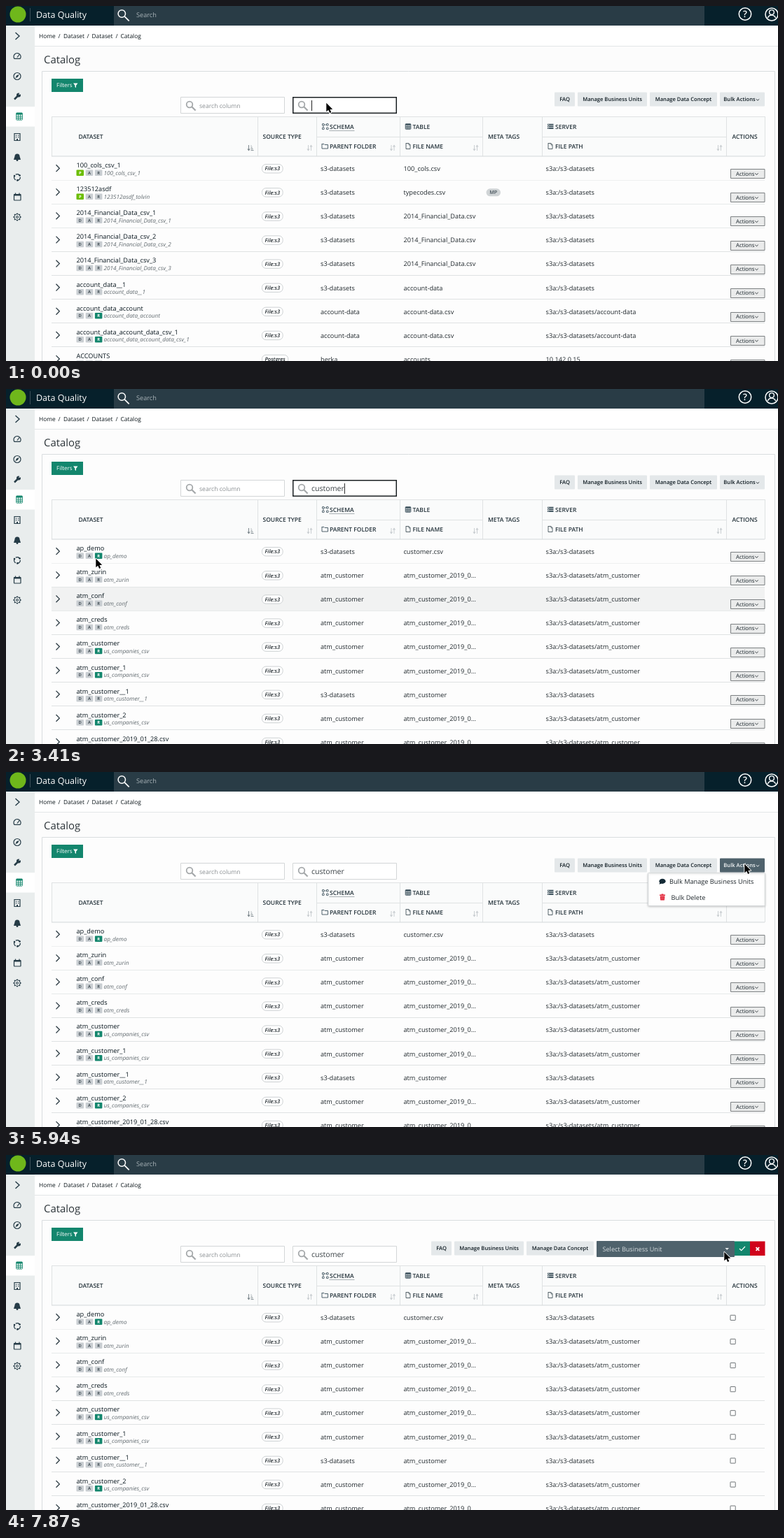
Recreate the animation shown at these times as an HTML page with a canvas. Size 1102x508 px, loop 8 s.

```html
<!DOCTYPE html>
<html lang="en">
<head>
<meta charset="utf-8">
<title>Data Quality catalog</title>
<style>
html, body { margin: 0; width: 100%; height: 100%; overflow: hidden; background: #fcfcfc; }
canvas { display: block; }
</style>
</head>
<body>
<canvas id="stage" width="1102" height="508"></canvas>
<script>
const W = 1102, H = 508, LOOP = 8000;
const ctx = document.getElementById('stage').getContext('2d');
const INK = '#20282d', LINE = '#dfe2e3', GREEN = '#13866d', NAVY = '#06202b', SLATE = '#4f626c';
const ROW_TOP = 215, ROW_H = 34.1;

// Each entry: start time, then the value held until the next entry.
const TYPED = [[0, ''], [600, 'c'], [750, 'cu'], [890, 'cus'], [1190, 'custom'], [1340, 'customer']];
const CARET = [[0, true], [300, false], [600, true], [1780, false], [2380, true], [2830, false], [3410, true], [3860, false]];
const POINTER = [
  [0, 457, 138], [2830, 430, 195], [2980, 315, 305], [3130, 205, 383], [3270, 140, 305],
  [3410, 128, 242], [3560, 150, 230], [3710, 225, 280], [3860, 323, 324], [4010, 470, 290],
  [4160, 660, 232], [4310, 850, 180], [4450, 985, 145], [4600, 1050, 127], [4750, 1056, 123],
  [5800, 1054, 131], [5950, 1050, 146], [6090, 1048, 155], [7580, 1040, 147], [7730, 1033, 142], [7870, 1025, 138]
];
const stepIndex = (list, t) => list.findLastIndex(e => e[0] <= t);
const at = (list, t) => list[stepIndex(list, t)][1];

const s3 = (name, sub, badges, parent, file, path) =>
  ({ name, sub, badges, type: 'File:s3', parent, file, path: 's3a:/s3-datasets' + path });
const atm = (name, sub, badges) =>
  s3(name, sub, badges, 'atm_customer', 'atm_customer_2019_0...', '/atm_customer');
const finance = n =>
  s3('2014_Financial_Data_csv_' + n, '2014_Financial_Data_csv_' + n, 'DA', 's3-datasets', '2014_Financial_Data.csv', '');

const ALL_ROWS = [
  s3('100_cols_csv_1', '100_cols_csv_1', 'PA', 's3-datasets', '100_cols.csv', ''),
  { ...s3('123512asdf', '123512asdf_tolvin', 'PA', 's3-datasets', 'typecodes.csv', ''), tag: 'MP' },
  finance(1), finance(2), finance(3),
  s3('account_data__1', 'account_data__1', 'DA', 's3-datasets', 'account-data', ''),
  s3('account_data_account', 'account_data_account', 'DA+', 'account-data', 'account-data.csv', '/account-data'),
  s3('account_data_account_data_csv_1', 'account_data_account_data_csv_1', 'DA+', 'account-data', 'account-data.csv', '/account-data'),
  { name: 'ACCOUNTS', sub: '', badges: 'DA', type: 'Postgres', parent: 'berka', file: 'accounts', path: '10.142.0.15' }
];
const FOUND_ROWS = [
  s3('ap_demo', 'ap_demo', 'DA+', 's3-datasets', 'customer.csv', ''),
  atm('atm_zurin', 'atm_zurin', 'DA'), atm('atm_conf', 'atm_conf', 'DA'), atm('atm_creds', 'atm_creds', 'DA'),
  atm('atm_customer', 'us_companies_csv', 'DA+'), atm('atm_customer_1', 'us_companies_csv', 'DA+'),
  s3('atm_customer__1', 'atm_customer__1', 'DA', 's3-datasets', 'atm_customer', ''),
  atm('atm_customer_2', 'us_companies_csv', 'DA+'), atm('atm_customer_2019_01_28.csv', '', 'DA')
];

function rect(x, y, w, h, fill, stroke, r = 0, lw = 1) {
  ctx.beginPath();
  ctx.roundRect(x, y, w, h, r);
  if (fill) { ctx.fillStyle = fill; ctx.fill(); }
  if (stroke) { ctx.strokeStyle = stroke; ctx.lineWidth = lw; ctx.stroke(); }
}
function circle(x, y, r, fill, stroke, lw = 1) {
  rect(x - r, y - r, 2 * r, 2 * r, fill, stroke, r, lw);
}
function line(color, lw, ...pts) {
  ctx.beginPath();
  for (let i = 0; i < pts.length; i += 2) ctx.lineTo(pts[i], pts[i + 1]);
  ctx.strokeStyle = color;
  ctx.lineWidth = lw;
  ctx.stroke();
}
function poly(fill, ...pts) {
  ctx.beginPath();
  for (let i = 0; i < pts.length; i += 2) ctx.lineTo(pts[i], pts[i + 1]);
  ctx.fillStyle = fill;
  ctx.fill();
}
const setFont = (size, style = '') => { ctx.font = `${style} ${size}px "Open Sans", "Noto Sans", sans-serif`; };
// y is the middle of the capital letters.
function text(str, x, y, size, color = INK, style = '', align = 'left') {
  setFont(size, style);
  ctx.textAlign = align;
  ctx.fillStyle = color;
  ctx.fillText(str, x, y + size * 0.36);
}
function magnifier(x, y, r, color, lw) {
  circle(x, y, r, null, color, lw);
  line(color, lw * 1.2, x + r * 0.7, y + r * 0.7, x + r * 2, y + r * 2);
}
function chevronDown(x, y, color) {
  line(color, 0.9, x - 2.2, y - 0.8, x, y + 1.2, x + 2.2, y - 0.8);
}
function pageIcon(x, y) {
  line('#45535b', 0.9, x - 3, y - 4, x + 1, y - 4, x + 3, y - 2, x + 3, y + 4, x - 3, y + 4, x - 3, y - 4.4);
  line('#45535b', 0.8, x + 1, y - 4, x + 1, y - 1.6, x + 3, y - 1.6);
}
function tableIcon(x, y, w, h, color) {
  rect(x - w / 2, y - h / 2, w, h, null, color, 0.5);
  rect(x - w / 2, y - h / 2, w, h / 4, color);
  for (const k of [-1, 1]) line(color, 0.9, x + k * w / 6, y - h / 2, x + k * w / 6, y + h / 2);
  for (const k of [0, 0.25]) line(color, 0.9, x - w / 2, y + h * k, x + w / 2, y + h * k);
}
function sortIcon(x, y, color, bars) {
  line(color, 1, x - 2, y - 4, x - 2, y + 3.5);
  poly(color, x - 4.2, y + 1.5, x + 0.2, y + 1.5, x - 2, y + 4.5);
  if (bars) {
    for (let i = 0; i < 4; i++) line(color, 1, x + 1, y - 3 + i * 2.2, x + 2 + i, y - 3 + i * 2.2);
  } else {
    line(color, 1, x + 2, y - 3.5, x + 2, y + 4);
    poly(color, x - 0.2, y - 1.5, x + 4.2, y - 1.5, x + 2, y - 4.5);
  }
}

function drawTopBar() {
  rect(0, 0, W, 28, NAVY);
  rect(154, 0, 843, 28, '#293c46');
  circle(17, 12, 11.5, '#6fb71b');
  rect(34, 3, 1, 19, '#3a4d57');
  text('Data Quality', 43, 12.5, 12.5, '#fff');
  magnifier(165.3, 11, 5.2, '#fff', 1.5);
  text('Search', 186, 12.5, 9.2, '#a9b3b8');
  circle(1055, 11.5, 8.7, null, '#fff', 1.5);
  text('?', 1055, 11.8, 13, '#fff', '600', 'center');
  circle(1093, 12, 9, null, '#fff', 1.5);
  circle(1093, 9, 3.4, null, '#fff', 1.4);
  ctx.beginPath();
  ctx.arc(1093, 19, 6, Math.PI * 1.1, Math.PI * 1.9);
  ctx.stroke();
}

function drawSidebar() {
  const c = '#263c47';
  rect(0, 28, 41, H, '#e9eded');
  rect(0, 144, 41, 28.5, '#fff');
  line(c, 1.4, 13.5, 38, 19, 43, 13.5, 48);
  ctx.beginPath();
  ctx.arc(16, 72.5, 5, Math.PI * 0.8, Math.PI * 2.2);
  ctx.closePath();
  ctx.lineWidth = 1.2;
  ctx.stroke();
  line(c, 1.2, 16, 73.5, 19, 69.5);
  circle(16, 100.5, 5, null, c, 1.2);
  poly(c, 18.7, 97.8, 17, 101.5, 13.3, 103.2, 15, 99.5);
  line(c, 2.5, 12, 133.5, 17, 128.5);
  circle(18, 127.5, 3, c);
  poly('#e9eded', 18, 127, 20, 123.5, 22.5, 126);
  tableIcon(19, 158, 8.5, 10, GREEN);
  rect(12, 182.5, 8, 10, null, c, 0, 1.2);
  for (const x of [14, 17]) for (const y of [184.5, 187]) rect(x, y, 1.3, 1.3, c);
  rect(15, 190, 2, 2.5, c);
  ctx.beginPath();
  ctx.arc(16, 215, 3.5, Math.PI, 0);
  ctx.lineTo(21, 220);
  ctx.lineTo(11, 220);
  ctx.fillStyle = c;
  ctx.fill();
  circle(16, 220.7, 1.4, c);
  for (let i = 0; i < 3; i++) {
    const a = i * Math.PI * 2 / 3;
    ctx.beginPath();
    ctx.arc(16, 245, 4.4, a, a + 1.5);
    ctx.strokeStyle = c;
    ctx.lineWidth = 1.4;
    ctx.stroke();
    circle(16 + 4.4 * Math.cos(a + 1.5), 245 + 4.4 * Math.sin(a + 1.5), 1.3, c);
  }
  rect(11.5, 269.5, 9.5, 8.5, null, c, 0.5, 1.2);
  rect(11.5, 269.5, 9.5, 2, c);
  for (const x of [13.5, 19]) line(c, 1.2, x, 267.5, x, 270);
  for (let i = 0; i < 8; i++) {
    const a = i * Math.PI / 4, dx = Math.cos(a), dy = Math.sin(a);
    line(c, 1.6, 16 + 4 * dx, 302 + 4 * dy, 16 + 5.6 * dx, 302 + 5.6 * dy);
  }
  circle(16, 302, 4.2, null, c, 1.1);
  circle(16, 302, 1.5, null, c, 1);
}

function searchBox(x, focused) {
  if (focused) rect(x + 0.75, 130.75, 147.5, 22.5, '#fff', '#1b2023', 0, 1.5);
  else rect(x + 0.5, 130.5, 148, 23, '#fff', '#d3d6d7');
  magnifier(x + 13, 141, 4.3, '#a4a8aa', 1.8);
}

function button(label, x, w, active) {
  rect(x, 123.5, w, 20, active ? SLATE : '#e4e8ea', null, 1);
  const arrow = label === 'Bulk Actions';
  text(label, x + w / 2 - (arrow ? 4 : 0), 133.5, 7.6, active ? '#f4f6f7' : '#101c23', '600', 'center');
  if (arrow) chevronDown(x + w - 10, 134, active ? '#fff' : INK);
}

function drawToolbar(t) {
  rect(65, 104, 45, 19, GREEN);
  text('Filters', 72, 113.5, 8, '#fff', '500');
  poly('#fff', 96, 110.5, 102.5, 110.5, 100, 113.7, 100, 117, 98.5, 116, 98.5, 113.7);

  searchBox(249, false);
  text('search column', 276, 142.5, 8.6, '#8a8f92');
  searchBox(409, t < 4750);
  const typed = at(TYPED, t);
  text(typed, 436, 142, 10.6, '#3a4145');
  if (at(CARET, t)) rect(436 + ctx.measureText(typed).width, 135, 1, 15, '#222');

  const form = t >= 6830, dx = form ? -176 : 0;
  button('FAQ', 783 + dx, 29, false);
  button('Manage Business Units', 816 + dx, 99, false);
  button('Manage Data Concept', 919 + dx, 96, false);
  if (!form) return button('Bulk Actions', 1019, 64, t >= 4600 && t < 6680);

  const dark = t >= 7870;
  rect(843.5, 123.5, 196, 22, dark ? SLATE : '#fff', dark ? SLATE : '#cfd3d5');
  text('Select Business Unit', 851.5, 134.5, 9.1, dark ? '#d5dbde' : '#9a9ea0');
  poly(dark ? '#e4e8ea' : '#3a4348', 1026.5, 133, 1032, 133, 1029.2, 136);
  rect(1040, 123.5, 22, 20.5, GREEN);
  line('#fff', 1.2, 1047, 134, 1049.7, 136.7, 1055, 131);
  rect(1062, 123.5, 21.5, 20.5, '#d0021b');
  for (const s of [-1, 1]) line('#fff', 1.9, 1070.6, 134.5 - 2.3 * s, 1075.2, 134.5 + 2.3 * s);
}

function drawTableHead() {
  rect(65, 158, 1018, 57, '#fafbfb');
  for (const x of [65, 359, 443, 562, 680, 765, 1028, 1083]) rect(x, 158, 1, 57, LINE);
  rect(65, 158, 1018, 1, LINE);
  rect(65, 214.5, 1018, 1, '#d3d7d9');
  rect(443, 187, 237, 1, LINE);
  rect(765, 187, 263, 1, LINE);
  const head = (label, x, y) => text(label, x, y, 8.5, '#26343c', '600');
  head('DATASET', 103.5, 187);
  head('SOURCE TYPE', 366.5, 187);
  head('SCHEMA', 462, 172.5);
  head('PARENT FOLDER', 462, 200.8);
  head('TABLE', 580.5, 172.5);
  head('FILE NAME', 580.5, 200.8);
  head('META TAGS', 688, 187);
  head('SERVER', 784, 172.5);
  head('FILE PATH', 784, 200.8);
  head('ACTIONS', 1036.5, 187);
  for (let x = 462; x < 497; x += 2) rect(x, 178, 1, 1, '#56636a');
  sortIcon(348.5, 203, '#7b868c', true);
  for (const x of [433.5, 552, 670.5, 1018.5]) sortIcon(x, 203, '#c9ced1');

  const c = '#3d525d';
  for (const x of [451.5, 457.5]) for (const y of [168.5, 174]) rect(x, y, 2.6, 2.6, null, c, 0.4, 0.9);
  line(c, 0.7, 454, 170, 457.5, 170);
  line(c, 0.7, 453, 171, 453, 174);
  tableIcon(574, 172.5, 7.5, 7.5, c);
  for (let i = 0; i < 3; i++) {
    rect(773, 168.7 + i * 2.7, 8.5, 1.9, c);
    rect(774, 169.2 + i * 2.7, 1, 0.9, '#fff');
  }
  line(c, 0.9, 451, 197.5, 454, 197.5, 455, 198.5, 459.5, 198.5, 459.5, 204, 451, 204, 451, 197);
  pageIcon(574, 200.5);
  pageIcon(777, 200.5);
}

function badge(letter, x, y, fill) {
  rect(x, y, 10.5, 8.5, fill || '#c9ced2', null, 1);
  text(letter, x + 5.25, y + 4.3, 5.8, fill ? '#fff' : '#48535a', '700', 'center');
}

function drawRow(row, i, boxes, hover) {
  const top = ROW_TOP + i * ROW_H, mid = top + 17.75;
  rect(65, top + 0.5, 1018, ROW_H, hover ? '#f1f2f2' : '#fdfdfd');
  rect(65, Math.round(top + ROW_H - 0.5), 1018, 1, LINE);
  line('#2b3a42', 1.3, 71.5, top + 12.3, 76.3, top + 17.2, 71.5, top + 22.1);
  text(row.name, 100.5, top + 12.75, 9.2, '#07151d');
  const by = top + 19.4;
  badge(row.badges[0], 100.5, by, row.badges[0] === 'P' ? '#6bbd00' : null);
  badge('A', 113.7, by);
  badge('R', 126.9, by, row.badges[2] ? GREEN : null);
  text(row.sub, 139.5, top + 23.8, 8.2, '#626b70', 'italic');

  setFont(7.6, 'italic 600');
  const pill = ctx.measureText(row.type).width + 8;
  rect(365.5, mid - 6.2, pill, 12.4, '#fff', '#c8cccf', 5.5, 0.9);
  text(row.type, 369.5, mid, 7.6, INK, 'italic 600');
  text(row.parent, 449, mid, 9.2);
  text(row.file, 567.5, mid, 9.2);
  text(row.path, 770.5, mid, 9.2);
  if (row.tag) {
    rect(685.5, mid - 5.5, 20.5, 11, '#d0d4d6', null, 5.5);
    text(row.tag, 695.7, mid, 7.2, '#46525a', '600', 'center');
  }
  if (boxes) return rect(1034, mid - 3.5, 7.2, 7.2, '#fff', '#6f7477', 0.4);
  rect(1034.5, Math.round(top + 18.2) + 0.5, 48.5, 13, '#eaebeb', '#7c8082');
  text('Actions', 1042, top + 25, 7.8, '#172229');
  chevronDown(1071.5, top + 25.2, INK);
}

function drawMenu(t) {
  ctx.save();
  ctx.shadowColor = 'rgba(0,0,0,.18)';
  ctx.shadowBlur = 3;
  ctx.shadowOffsetY = 1;
  rect(916.5, 144.5, 167, 47, '#fff', '#d4d7d9', 1);
  ctx.restore();
  if (t >= 6090) rect(919, 147, 163, 20, '#f1f2f3');
  ctx.beginPath();
  ctx.ellipse(937, 156.3, 4.6, 3.6, 0, 0, Math.PI * 2);
  ctx.fillStyle = '#142a36';
  ctx.fill();
  poly('#142a36', 933.5, 157, 936, 159.5, 932.5, 160.7);
  text('Bulk Manage Business Units', 947, 157, 9.2);
  const red = '#e0182d';
  rect(933, 175.5, 8, 1.4, red);
  rect(935.5, 174.5, 3, 1.2, red);
  poly(red, 933.7, 177.5, 940.3, 177.5, 939.8, 183.5, 934.2, 183.5);
  for (const x of [935.6, 937, 938.4]) line('#f5a6ae', 0.5, x, 178.5, x, 182.5);
  text('Bulk Delete', 949.5, 179.5, 9.2);
}

function drawPointer(x, y) {
  ctx.save();
  ctx.translate(x + 0.3, y + 0.8);
  ctx.beginPath();
  for (const [px, py] of [[0, 0], [0, 12.5], [2.9, 10], [4.8, 14.3], [7, 13.3], [5.1, 9.2], [8.9, 9]]) ctx.lineTo(px, py);
  ctx.closePath();
  ctx.lineJoin = 'round';
  ctx.strokeStyle = '#fff';
  ctx.lineWidth = 1.8;
  ctx.stroke();
  ctx.fillStyle = '#000';
  ctx.fill();
  ctx.restore();
}

function draw(t) {
  rect(0, 0, W, H, '#fcfcfc');
  rect(41, 28, W, 29, '#fff');
  rect(41, 57, W, 1, '#e3e6e7');
  drawTopBar();
  drawSidebar();
  [['Home', 47], ['/', 74.5], ['Dataset', 82], ['/', 115.5], ['Dataset', 122.5], ['/', 156.5], ['Catalog', 163.5]]
    .forEach(([word, x]) => text(word, x, 42.5, 8.4, '#0b151a', '500'));
  text('Catalog', 54, 76.5, 14.9, '#2b3338');
  rect(51.5, 93.5, 1046, 500, '#fdfdfd', '#d9dddf');

  const k = stepIndex(POINTER, t), [, px, py] = POINTER[k];
  // Row highlight trails the pointer by one step.
  const lastY = k > 0 && t < 4310 ? POINTER[k - 1][2] : 0;
  const hoverRow = Math.floor((lastY - ROW_TOP) / ROW_H);
  const rows = t < 1630 ? ALL_ROWS : FOUND_ROWS;
  rows.forEach((row, i) => drawRow(row, i, t >= 7130, i === hoverRow));
  drawTableHead();
  drawToolbar(t);
  if (t >= 4750 && t < 6830) drawMenu(t);
  drawPointer(px, py);
}

ctx.textRendering = 'geometricPrecision';
const start = performance.now();
function tick() {
  draw((performance.now() - start) % LOOP);
  requestAnimationFrame(tick);
}
tick();
</script>
</body>
</html>
```
